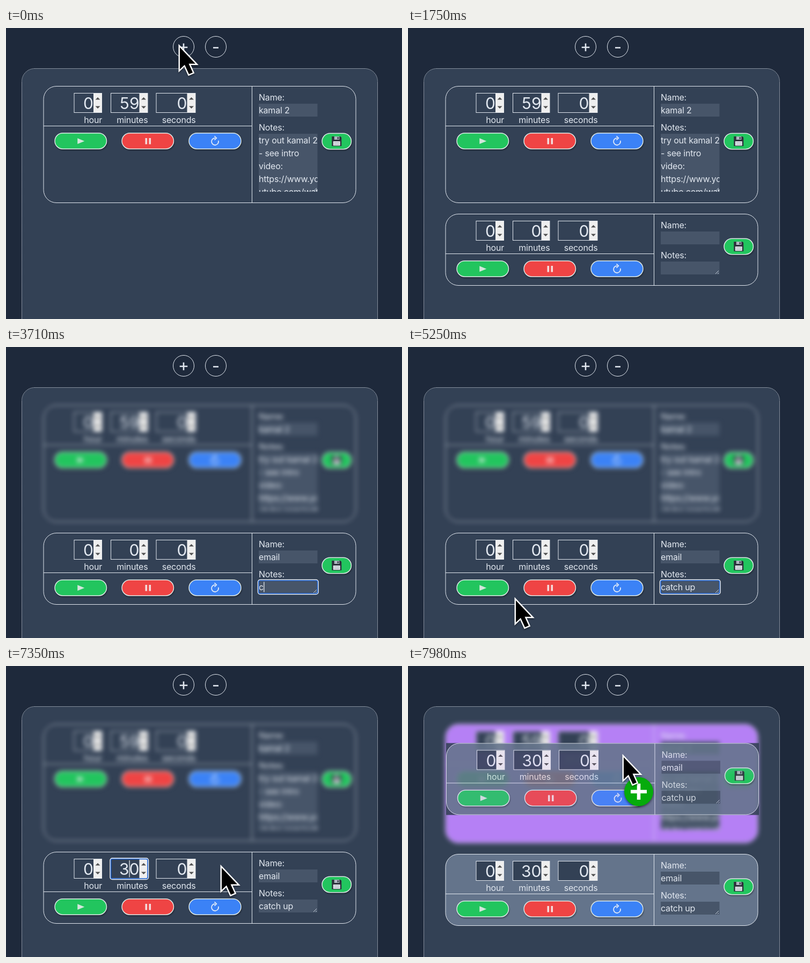
An HTML page for the animation above (8000 ms loop, 738 by 542 pixels).

```html
<!DOCTYPE html>
<html lang="en">
<head>
<meta charset="utf-8">
<title>Timers</title>
<style>
  html, body { margin: 0; width: 100%; height: 100%; overflow: hidden; background: #1e293b; }
  svg { display: block; width: 738px; height: 542px; }
  text { font: 16px Inter, "Liberation Sans", sans-serif; letter-spacing: -.2px; fill: #e2e8f0; white-space: pre; }
  .num { font-size: 30px; letter-spacing: 0; }
  .num, .label { text-anchor: end; }
  .line { fill: none; stroke: #e2e8f0; }
  .box { fill: #334155; stroke: #e2e8f0; }
  .field { fill: #475569; }
  .button rect { stroke: #dce8e6; stroke-width: 1.5; filter: drop-shadow(1px 2px 1px #0005); }
  .blurred { filter: blur(4px); }
  .lifted .frame { fill: #64748b; }
  .over .frame { fill: #b580f5; }
</style>
</head>
<body>
<svg viewBox="0 0 738 542" id="stage"></svg>
<script>
const LOOP = 8000, STEP = 70;
const $ = id => document.getElementById(id);

const rect = (x, y, w, h, attrs = '') => `<rect x="${x}" y="${y}" width="${w}" height="${h}" ${attrs}/>`;
const text = (x, y, value, attrs = '') => `<text x="${x}" y="${y}" ${attrs}>${value}</text>`;

const button = (x, y, w, color, icon) =>
  `<g class="button" transform="translate(${x} ${y})">
    ${rect(0, -14.7, w, 29.4, `rx="14.7" fill="${color}"`)}
    <g transform="translate(${w / 2} 0)">${icon}</g>
  </g>`;

const icons = {
  play: '<path d="M-6 -5.2L7 0.2L-6 5.4Z" fill="#d3e6dc"/>',
  pause: '<path d="M-3 -5.5V6M4 -5.5V6" stroke="#f5dada" stroke-width="3.6"/>',
  reset: '<path d="M0 -5.5A6.5 6.5 0 1 0 6.3 -.8M-1 -9.2L2.8 -5.5L-1 -1.9" fill="none" stroke="#dfe9f8" stroke-width="1.8"/>',
  save: `<path d="M-9 -9H7L9 -7V9H-9Z" fill="#2c303b"/><path d="M-4.5 -9H5V-3H-4.5Z" fill="#aeb6c0"/>
    <path d="M1.5 -8H3.5V-4H1.5Z" fill="#2c303b"/><path d="M-6.5 0H6.5V8H-6.5Z" fill="#e4e8ec"/>
    <path d="M-5 2.5H5M-5 5.5H5" stroke="#9aa3ad"/>`
};

function numberInput(x, right, value, label, id = '') {
  const mid = right - 8;
  return rect(x + .5, 13.5, right - x - 1, 36, 'class="box"') +
    rect(right - 16, 14, 15.5, 35.5, 'fill="#efefef"') +
    `<path d="M${mid - 4.5} 25.5l4.5 -4.5 4.5 4.5ZM${mid - 4.5} 37.5l4.5 4.5 4.5 -4.5Z" fill="#505050"/>` +
    text(right - 16, 43, value, `class="num" ${id}`) +
    text(right, 68.5, label, 'class="label"');
}

function card({ id, height, minutes, name, notes, notesHeight, saveY }) {
  const lines = notes.map((line, i) => text(471, 107 + i * 24, line, `id="${id}Notes${i}"`)).join('');
  const bottom = 89 + notesHeight;
  return `<g id="${id}Body">
    ${rect(70, .5, 582, height, `rx="24" class="line frame" id="${id}Frame"`)}
    <path class="line" d="M458.5 .5V${height + .5}M70 74.5H458.5"/>
    ${numberInput(126.5, 179, 0, 'hour')}
    ${numberInput(195, 264.5, minutes, 'minutes', `id="${id}Minutes"`)}
    ${numberInput(279.5, 353.5, 0, 'seconds')}
    ${button(91, 102.5, 96.5, '#22c55e', icons.play)}
    ${button(216, 102.5, 96.5, '#ef4444', icons.pause)}
    ${button(341, 102.5, 97, '#3b82f6', icons.reset)}
    ${button(589, saveY, 54.5, '#22c55e', icons.save)}
    ${text(471, 27, 'Name:')}
    ${rect(471, 33, 109.5, 24, 'class="field"')}
    ${text(471, 51, name, `id="${id}Name"`)}
    ${text(471, 83, 'Notes:')}
    ${rect(471, 89, 109.5, notesHeight, 'class="field"')}
    <clipPath id="${id}Clip">${rect(471, 89, 109.5, notesHeight)}</clipPath>
    <g clip-path="url(#${id}Clip)">${lines}</g>
    <path d="M573 ${bottom - 1}l6 -6M577 ${bottom - 1}l2 -2" stroke="#cbd5e1"/>
  </g>`;
}

$('stage').innerHTML = `
  ${rect(0, 0, 738, 542, 'fill="#1e293b"')}
  <circle id="plus" class="line" cx="331" cy="35" r="19.5"/>
  <circle class="line" cx="391" cy="35" r="19.5"/>
  <path d="M323.7 36H338.3M331 28.7V43.3M386 36.7H396" stroke="#e2e8f0" stroke-width="2.6"/>
  ${rect(29.5, 75.5, 663, 520, 'rx="24" fill="#334155" stroke="#e2e8f0" stroke-dasharray="1 1"')}
  <g transform="translate(0 108)"><g id="first">${card({
    id: 'first', height: 217, minutes: 59, name: 'kamal 2', notesHeight: 108, saveY: 103,
    notes: ['try out kamal 2', '- see intro', 'video:', 'https://www.yo', 'utube.com/wat']
  })}</g></g>
  <g id="second">${card({
    id: 'second', height: 133, minutes: 0, name: '', notesHeight: 24, saveY: 61, notes: ['']
  })}</g>
  <g id="focus" fill="none" stroke-width="1.6">
    <rect id="ringOuter" rx="4" stroke="#f8fafc"/><rect id="ringInner" rx="2.5" stroke="#1d62d2"/>
  </g>
  <rect id="caret" width="1.2" fill="#f1f5f9"/>
  <g id="ghost" class="lifted" opacity=".88">
    ${rect(69.5, 0, 583, 134, 'fill="#334155"')}<use href="#secondBody"/>
  </g>
  <g id="cursor">
    <g id="badge" transform="translate(30 69)">
      <circle r="27" fill="#06ab0c" style="filter:drop-shadow(0 2px 2px #0008)"/>
      <path d="M-15 0H15M0 -15V15" stroke="#fff" stroke-width="6.5"/>
    </g>
    <path transform="translate(2 5)" d="M0 0V41L9 32.5L17 50L24 47L16.5 30.5H29Z"
      stroke="#fff" stroke-width="5" paint-order="stroke" style="filter:drop-shadow(0 2px 1.5px #0006)"/>
  </g>`;

// Pointer paths as [time, x, y]; the pointer is hidden between paths.
const paths = [
  [[0, 322, 31], [210, 322, 31], [280, 323, 32], [700, 323, 32], [1190, 336, 204],
   [1260, 336, 204], [1400, 588, 463], [1470, 588, 463], [1680, 489, 402]],
  [[2100, 560, 412], [2310, 686, 486]],
  [[5040, 202, 471], [5180, 202, 471], [5250, 199, 467], [5390, 355, 390]],
  [[6720, 198, 401], [6860, 300, 334], [7000, 392, 368], [7140, 392, 368],
   [7280, 399, 371], [7350, 400, 371], [LOOP, 400, 371]]
];
const nameTimes = [2380, 2520, 2660, 2730, 2800];
const notesTimes = [3710, 3850, 4060, 4270, 4340, 4480, 4480, 4550];

const typed = (word, times, t) => word.slice(0, times.filter(at => at <= t).length);
const between = (t, from, to) => t >= from && t < to;
const show = (id, visible) => $(id).style.display = visible ? '' : 'none';
const move = (id, x, y) => $(id).setAttribute('transform', `translate(${x} ${y})`);
const setAttrs = (id, attrs) => Object.entries(attrs).forEach(([key, value]) => $(id).setAttribute(key, value));

function pointerAt(t) {
  const path = paths.find(p => between(t, p[0][0], p.at(-1)[0] + STEP));
  if (!path) return null;
  const i = path.findIndex(key => key[0] >= t);
  if (i <= 0) return path.at(i).slice(1);
  const [a, b] = [path[i - 1], path[i]];
  const k = (t - a[0]) / (b[0] - a[0]);
  return [a[1] + (b[1] - a[1]) * k, a[2] + (b[2] - a[2]) * k];
}

function focusAt(t) {
  if (between(t, 2030, 3080)) return { x: 471, y: 379, w: 109.5, h: 24, typedIn: 'secondName' };
  if (between(t, 3080, 5810)) return { x: 471, y: 435, w: 109.5, h: 24, typedIn: 'secondNotes0' };
  if (between(t, 5810, 7560)) return { x: 195.5, y: 359.5, w: 68.5, h: 36.5 };
  return null;
}

function drawFocus(t) {
  const f = focusAt(t);
  const blinkedOff = between(t, 5110, 5600) || between(t, 6790, 7280);
  show('focus', f);
  show('caret', f && !blinkedOff);
  if (!f) return;
  const ring = (id, grow) => setAttrs(id, {
    x: f.x - grow, y: f.y - grow, width: f.w + 2 * grow, height: f.h + 2 * grow
  });
  ring('ringOuter', 1.4);
  ring('ringInner', 0);
  setAttrs('caret', {
    x: f.typedIn ? f.x + $(f.typedIn).getComputedTextLength() + .3 : 229.5,
    y: f.y + 2.5, height: f.h - 5
  });
}

function draw(t) {
  const dragging = t >= 7560;
  const p = Math.min(1, Math.max(0, (t - 7520) / 460));
  const lift = p * p * (3 - 2 * p);
  const over = dragging && lift > .23;

  $('plus').style.fill = between(t, 280, 910) ? '#334155' : 'none';
  $('first').setAttribute('class', (t >= 2030 ? 'blurred ' : '') + (over ? 'over' : ''));
  $('firstFrame').setAttribute('height', over ? 221 : 217);

  show('second', t >= 770);
  $('second').setAttribute('class', dragging ? 'lifted' : '');
  move('second', 0, over ? 350 : 346);
  $('secondName').textContent = typed('email', nameTimes, t);
  $('secondNotes0').textContent = typed('catch up', notesTimes, t);
  $('secondMinutes').textContent = t >= 6300 ? 30 : 0;
  drawFocus(t);

  show('ghost', dragging);
  move('ghost', 1.5 * lift, 346 - 202.5 * lift);

  const pointer = pointerAt(t);
  show('cursor', pointer);
  show('badge', over);
  if (pointer) move('cursor', pointer[0], pointer[1] - (dragging ? 206 * lift : 0));
}

function frame(now) {
  draw(Math.floor(now % LOOP / STEP) * STEP);
  requestAnimationFrame(frame);
}
draw(0);
requestAnimationFrame(frame);
</script>
</body>
</html>
```
